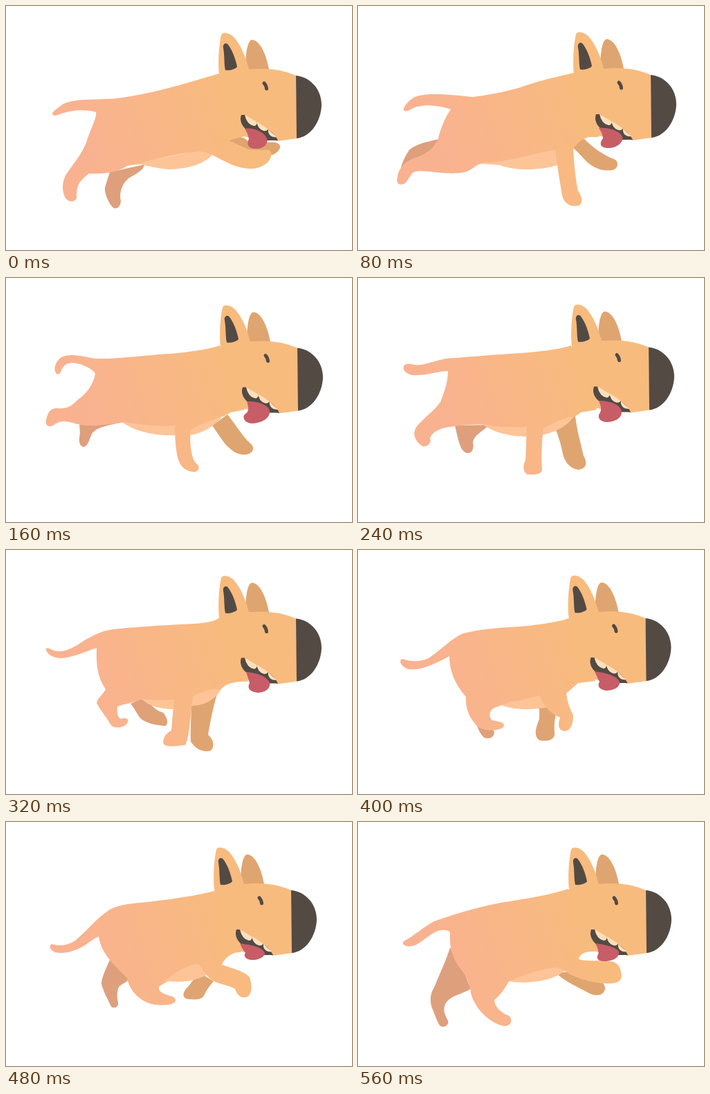
Write an HTML page that moves like this. It is 500 px wide and 354 px high and loops after 640 ms.

```html
<!DOCTYPE html>
<html lang="en">
<head>
<meta charset="utf-8">
<title>Running dog</title>
<style>
  html, body { margin: 0; width: 100%; height: 100%; overflow: hidden; background: #fff; }
  svg { display: block; width: 100%; height: 100%; }
</style>
</head>
<body>
<svg viewBox="0 0 500 354">
  <defs>
    <linearGradient id="coat" gradientUnits="userSpaceOnUse" x1="120" y1="210" x2="325" y2="140">
      <stop offset="0" stop-color="#f9b290"/>
      <stop offset="1" stop-color="#f8bb7e"/>
    </linearGradient>
    <linearGradient id="shade" gradientUnits="userSpaceOnUse" x1="150" y1="0" x2="300" y2="0">
      <stop offset="0" stop-color="#de9f7d"/>
      <stop offset="1" stop-color="#dfa570"/>
    </linearGradient>
  </defs>
  <path id="farEar" fill="#dfa570" d="M346,92 C346,68 349,49 356,49 C367,50 376,70 380,92Z"/>
  <path id="farHind" fill="url(#shade)"/>
  <path id="farFront" fill="url(#shade)"/>
  <path id="belly" fill="#fdc498"/>
  <path id="body" fill="url(#coat)"/>
  <g id="head">
    <path fill="#f8bb7e" d="M308,99 C306,80 308,55 311,42 C313,37 322,38 329,45 C339,56 347,75 351,92
      C375,89 400,92 419,101 L421,192 L392,196 L347,178 L352,191 C340,187 330,189 321,195 L312,190Z"/>
    <path fill="#534a44" d="M419,101 C440,103 456,121 456,144 C455,168 440,190 420,192Z"/>
    <path fill="#534a44" d="M314,61 C313,55 317,53 320,55 C327,63 332,78 334,88 C332,92 322,94 317,93 C315,85 316,72 314,61Z"/>
    <path fill="none" stroke="#534a44" stroke-width="5" stroke-linecap="round" d="M373,112 Q376,115 376.5,120"/>
    <path fill="#534a44" d="M340,158 C337,166 341,174 347,179 L374,195 L393,195 C390,189 386,184 380,180 C367,175 355,167 345,158Z"/>
    <path fill="#fce0bd" d="M345,158 L362,168 Q363,174 358,174 Q348,172 345,158Z
      M363,168 L378,178 Q378,182 372,181 Q363,178 363,168Z
      M379,179 L391,190 Q386,191 382,188 Q378,184 379,179Z"/>
  </g>
  <path id="tongue" fill="#c75d67"/>
</svg>
<script>
const STEP = 80;

// Head offset, then one outline per moving part.
const poses = [
  {
    head: [0, 0],
    body: `M308,98 C260,112 210,128 160,134 C130,137 95,133 80,144 C72,150 66,154 67,157 C69,160 74,159 78,157
      C95,150 118,150 130,154 C132,160 122,180 118,192 C112,212 100,225 90,240 C80,252 80,270 87,280
      C92,286 102,284 102,277 C102,262 104,255 120,243 C140,244 160,242 175,232 C205,226 250,212 285,211
      L298,216 C320,228 335,235 350,236 C365,237 380,230 383,218 C385,210 380,207 370,209 L350,208 Q338,202 322,195 L345,189Z`,
    belly: "M175,231 L285,208 L299,215 C290,226 270,236 235,237 C220,236 205,232 195,230Z",
    farHind: "M150,241 L200,230 C200,238 184,246 177,250 C168,258 163,270 166,283 C165,292 160,296 154,292 C146,282 142,270 143,263Z",
    farFront: "M320,195 C330,188 345,188 350,197 L378,198 C388,196 398,199 396,206 C393,213 385,217 380,217 Q350,212 320,195Z",
    tongue: "M345,178 C355,176 372,181 377,192 C380,200 372,208 360,207 C350,207 347,200 351,193 Q350,186 345,178Z"
  },
  {
    head: [4, -1],
    body: `M312,97 C290,102 270,106 235,118 C210,125 190,129 166,132 C130,128 95,125 80,133 C70,140 65,148 66,151
      C68,154 74,152 78,149 C90,142 115,143 134,150 C127,160 120,175 116,192 C110,208 95,217 80,221
      C65,227 58,238 57,248 C55,256 58,259 63,259 C70,259 72,250 80,241 C90,238 100,240 110,241
      C130,243 150,244 160,239 C170,233 172,229 185,227 C220,226 260,212 285,209 C288,235 292,255 295,275
      C298,288 310,293 320,289 C326,284 323,276 318,268 C314,250 312,225 311,207 C315,200 325,192 332,190 L348,190Z`,
    belly: "M172,228 L280,207 L290,210 L288,231 C265,238 230,240 205,231Z",
    farHind: "M117,193 C95,198 78,202 72,212 C66,222 63,230 62,235 L110,222Z",
    farFront: "M310,205 L324,190 C340,207 358,218 370,222 C378,226 376,236 368,238 C350,241 335,232 325,220 Q318,212 310,205Z",
    tongue: "M348,177 C360,176 378,180 382,190 C384,198 374,206 362,206 C350,206 348,200 354,192 Q354,186 348,177Z"
  },
  {
    head: [2, .5],
    body: `M309,98 C290,104 260,108 235,110 C200,112 160,118 128,117 C110,113 90,109 80,115 C70,122 68,134 73,139
      C77,142 79,136 82,130 C88,122 98,122 110,126 C120,130 128,135 129,139 C126,155 115,170 103,177
      C95,187 85,190 75,189 C62,188 60,198 58,206 C56,214 62,217 68,214 C75,208 82,207 92,209
      C105,213 120,216 140,213 C155,212 165,210 172,209 C195,213 225,216 244,214 C244,230 245,250 249,264
      C254,278 265,282 274,281 C280,279 280,273 275,269 C267,262 265,235 267,220 C280,212 300,205 316,200 L324,195 L345,191Z`,
    belly: "M168,209 C185,222 215,230 250,228 C275,231 295,220 312,202Z",
    farHind: "M106,213 L165,210 C145,214 130,217 124,226 C120,235 118,245 112,245 C105,244 105,235 107,225Z",
    farFront: "M298,214 L320,198 C330,210 342,230 353,240 C360,245 358,254 348,256 C335,258 325,250 316,240 Q306,226 298,214Z",
    tongue: "M348,179 C365,178 381,185 381,194 C381,206 365,211 355,211 C343,210 341,200 346,197 Q353,193 348,179Z"
  },
  {
    head: [1, -.5],
    body: `M308,98 C290,104 260,107 235,109 C200,111 165,114 140,116 C120,116 105,124 90,126 C78,127 73,122 68,126
      C62,130 68,140 80,141 C98,142 115,135 130,135 C130,150 125,165 119,180 C110,193 95,203 86,214
      C76,226 84,238 93,244 C101,246 107,238 104,232 C108,222 120,217 140,215 C160,213 175,212 185,213
      C205,217 228,217 244,216 C243,235 243,250 242,264 C238,272 238,282 245,285 C255,286 264,285 266,279
      C265,262 265,240 268,218 C282,210 298,202 312,202 L322,195 L345,191Z`,
    belly: "M180,212 C195,224 218,230 247,230 C275,229 300,218 311,202Z",
    farHind: "M140,214 L190,213 C178,224 168,228 166,238 C168,248 165,255 157,254 C148,250 146,240 140,214Z",
    farFront: "M285,218 L314,200 C316,220 322,240 326,258 C332,268 330,276 320,278 C308,278 299,268 296,255 Q292,235 285,218Z",
    tongue: "M348,178 C362,178 379,183 381,193 C382,204 370,209 359,209 C347,208 346,200 350,195 Q353,190 348,178Z"
  },
  {
    head: [0, -1.5],
    body: `M308,98 C306,101 295,106 270,107 C230,109 180,112 155,115 C140,117 130,122 115,130 C100,140 90,147 76,147
      C66,147 62,140 58,143 C57,148 64,156 78,157 C95,157 115,147 131,142 C130,165 132,185 144,202
      C140,210 132,215 131,222 C138,235 147,245 151,253 C155,259 166,259 174,253 C180,246 174,242 166,245
      C161,243 160,235 161,227 C175,222 185,222 195,216 C210,218 228,218 243,217 C241,235 240,252 239,262
      C230,266 225,276 228,282 C235,287 250,284 259,283 C264,275 266,250 270,212 C285,205 300,199 310,203
      C315,195 330,190 350,191Z`,
    belly: "M195,215 C205,226 222,231 243,231 L270,226 C290,225 305,214 310,203 C300,197 285,203 265,210Z",
    farHind: "M180,223 C188,232 190,242 198,247 C208,253 222,255 231,255 C235,250 233,243 227,236 C218,233 212,228 208,222 L195,216Z",
    farFront: "M268,222 L306,206 C300,225 296,245 292,268 C300,275 302,285 296,291 C285,294 275,290 267,278 C266,260 268,240 268,222Z",
    tongue: "M347,177 C360,178 376,182 381,192 C383,202 373,207 363,207 C350,205 349,199 352,193 Q350,186 347,177Z"
  },
  {
    head: [-3.5, -2],
    body: `M304,99 C290,105 255,109 235,111 C200,113 175,115 152,121 C135,128 120,145 102,157 C88,163 76,162 64,158
      C58,160 62,169 73,173 C90,175 108,167 132,154 C132,175 140,195 156,213 C155,228 160,245 175,258
      C188,264 208,262 211,255 C211,249 202,249 194,247 C188,242 190,235 195,230 C205,226 215,222 222,220
      C235,219 247,215 262,211 C268,228 280,238 292,243 C288,255 290,262 299,263 C309,261 311,250 311,240
      C305,228 302,218 301,208 L318,193 L343,190Z`,
    belly: "M205,224 C220,232 250,233 275,228 L300,206 L262,210Z",
    farHind: "M160,210 L190,222 C186,235 188,250 196,262 C200,270 190,276 182,272 C172,262 166,240 160,210Z",
    farFront: "M262,214 L295,212 C285,235 283,250 284,264 C286,274 276,279 262,276 C254,270 256,260 262,245Z",
    tongue: "M342,176 C355,178 373,181 378,191 C379,200 368,204 358,204 C347,202 346,196 349,191 Q346,186 342,176Z"
  },
  {
    head: [-7, -2],
    body: `M301,100 C280,106 240,112 205,116 C185,118 165,119 150,127 C130,140 115,160 100,172 C88,180 75,180 66,177
      C61,180 64,186 71,189 C85,192 100,187 112,180 C122,174 128,168 134,166 C136,185 150,203 175,226
      C178,245 195,262 215,265 C230,267 246,265 245,258 C244,252 235,253 228,249 C222,246 219,242 222,238
      C232,228 255,208 278,206 C285,215 290,225 300,231 C315,237 325,238 331,242 C334,252 340,256 348,254
      C356,250 356,238 352,225 C342,215 325,212 312,207 C316,196 328,188 340,189Z`,
    belly: "M222,238 C235,218 262,208 278,205 L290,222 C270,232 250,233 235,231Z",
    farHind: "M150,200 C145,212 138,225 138,235 C142,250 148,258 152,268 C156,271 163,269 162,262 C160,255 160,243 164,238 C172,232 177,232 177,226Z",
    farFront: "M300,231 L282,220 C270,226 270,232 262,240 C254,248 255,256 263,257 C275,258 284,258 287,250 C290,243 296,236 300,231Z",
    tongue: "M338,176 C350,178 370,180 374,190 C374,197 362,201 354,200 C345,199 343,193 346,190 Q341,184 338,176Z"
  },
  {
    head: [-3, -2],
    body: `M304,97 C280,105 250,110 220,115 C185,120 150,130 110,144 C95,152 80,166 66,173 C62,177 69,182 78,180
      C90,178 98,166 115,158 C122,156 130,156 133,160 C132,180 135,195 148,213 C158,225 163,240 163,248
      C170,275 195,294 212,296 C222,296 224,286 218,281 C208,278 197,268 197,258 C207,250 213,240 218,231
      C238,222 268,212 288,211 L297,215 C310,225 335,233 355,234 C368,235 380,234 381,224 C380,210 375,202 362,202
      C350,200 330,203 319,199 C320,192 328,187 345,188Z`,
    belly: "M217,231 C235,220 265,210 290,209 L299,215 C285,230 245,236 217,231Z",
    farHind: "M133,182 C128,200 118,220 110,240 C103,250 104,265 108,272 C112,282 115,292 119,296 C125,299 132,295 130,288 C124,278 122,270 128,261 C138,250 150,250 163,242 L150,210Z",
    farFront: "M285,218 L312,218 L340,228 C350,228 358,235 357,243 C354,252 345,253 335,249 C320,240 300,233 285,218Z",
    tongue: "M343,176 C352,177 373,181 377,188 C378,197 368,202 356,202 C346,202 344,197 347,192 Q349,188 343,176Z"
  }
];

const part = id => document.getElementById(id);
let shown = -1;

function draw() {
  const index = Math.floor(performance.now() / STEP) % poses.length;
  if (index !== shown) {
    const { head, ...outlines } = poses[shown = index];
    for (const id in outlines) part(id).setAttribute("d", outlines[id]);
    for (const id of ["head", "farEar"]) part(id).setAttribute("transform", `translate(${head})`);
  }
  requestAnimationFrame(draw);
}
draw();
</script>
</body>
</html>
```
